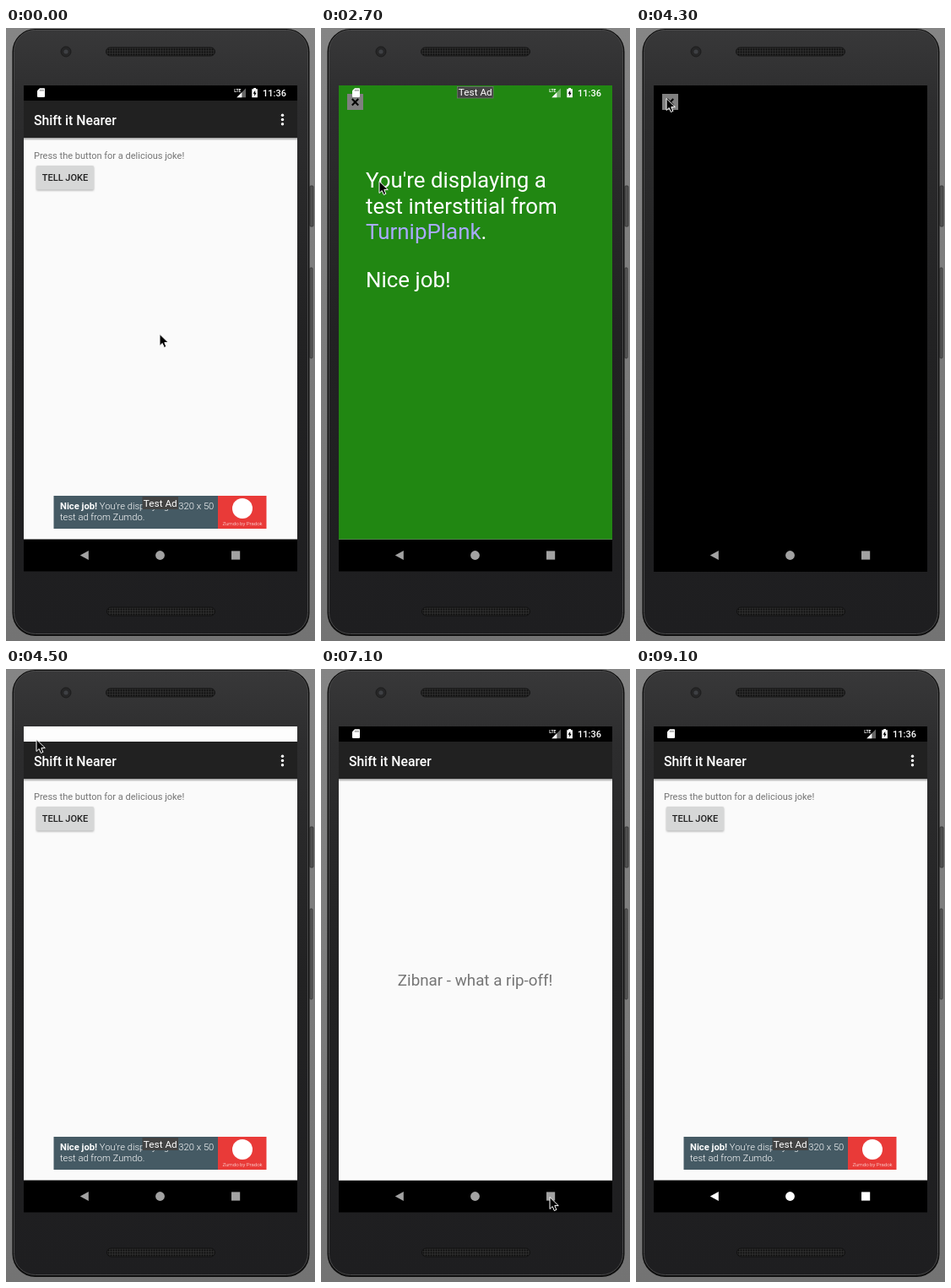
Animation, 366 px wide and 726 px high, one loop 9600 ms. Source, as an HTML page:

```html
<!DOCTYPE html>
<html lang="en">
<head>
<meta charset="utf-8">
<title>Joke app demo</title>
<style>
  html, body { margin: 0; width: 100%; height: 100%; overflow: hidden; background: #7f7f7f; }
  svg { display: block; width: 366px; height: 726px; font-family: Roboto, sans-serif; }
  text { white-space: pre; }
  .medium { font-weight: 500; }
  .small { font-size: 11.03px; }
  .title { font-size: 15.76px; font-weight: 500; fill: #fff; }
  .label { font-size: 11.8px; fill: #fff; text-anchor: middle; }
  .big { font-size: 25.9px; fill: #fff; }
  #button { fill: #d6d7d7; filter: drop-shadow(0 1px 1px rgba(0, 0, 0, .3)); }
  #joke, #inter, #blank, #close, #ring, #ripple { opacity: 0; }
</style>
</head>
<body>
<svg viewBox="0 0 366 726">
  <defs>
    <linearGradient id="body" x2="0" y2="1">
      <stop offset="0" stop-color="#383839"/>
      <stop offset=".12" stop-color="#2d2d2e"/>
      <stop offset=".5" stop-color="#222223"/>
      <stop offset="1" stop-color="#1e1e20"/>
    </linearGradient>
    <linearGradient id="room" x2="0" y2="1">
      <stop offset="0" stop-color="#858585"/>
      <stop offset="1" stop-color="#737373"/>
    </linearGradient>
    <linearGradient id="shade" x2="0" y2="1">
      <stop offset="0" stop-color="#000" stop-opacity=".38"/>
      <stop offset="1" stop-color="#000" stop-opacity="0"/>
    </linearGradient>
    <pattern id="mesh" width="3" height="3" patternUnits="userSpaceOnUse">
      <rect width="3" height="3" fill="#2b2b2b"/>
      <circle cx="1.5" cy="1.5" r="1" fill="#0c0c0c"/>
    </pattern>
    <clipPath id="screen"><rect x="21" y="68" width="324" height="575.5"/></clipPath>
    <clipPath id="navClip"><rect x="21" y="605.5" width="324" height="38"/></clipPath>
    <g id="page">
      <rect x="21" y="86" width="324" height="519.5" fill="#fafafa"/>
      <rect x="21" y="86" width="324" height="44" fill="#212121"/>
      <rect x="21" y="130" width="324" height="3.5" fill="url(#shade)"/>
      <text class="title" x="33" y="114.7">Shift it Nearer</text>
    </g>
  </defs>

  <!-- phone -->
  <rect width="366" height="726" fill="url(#room)"/>
  <rect x="360" y="187" width="4" height="48" rx="1" fill="#505050" stroke="#3a3a3a"/>
  <rect x="360" y="284" width="3" height="107" rx="1" fill="#585858" stroke="#3a3a3a"/>
  <rect x="7.5" y="1" width="352" height="719" rx="27" fill="#0e0e0e"/>
  <rect x="9.5" y="2.5" width="348" height="715" rx="25" fill="url(#body)" stroke="#49494a"/>
  <rect x="118.5" y="23" width="129" height="10" rx="5" fill="url(#mesh)" stroke="#151515"/>
  <rect x="119.5" y="686" width="128" height="10" rx="5" fill="url(#mesh)" stroke="#111"/>
  <circle cx="71" cy="28" r="6" fill="#262627" stroke="#1c1c1c"/>
  <circle cx="71" cy="28" r="2.6" fill="#3e4044"/>

  <g clip-path="url(#screen)">
    <rect x="21" y="68" width="324" height="576"/>

    <g id="main">
      <use href="#page"/>
      <g fill="#fff">
        <circle cx="327.5" cy="103.2" r="1.7"/>
        <circle cx="327.5" cy="108.5" r="1.7"/>
        <circle cx="327.5" cy="113.8" r="1.7"/>
      </g>
      <text class="small" x="33" y="155" fill="#757575">Press the button for a delicious joke!</text>
      <rect id="button" x="36" y="163" width="68" height="28.5" rx="1.6"/>
      <text class="small medium" x="70" y="181.3" text-anchor="middle" fill="#212121">TELL JOKE</text>

      <rect x="56.5" y="554" width="195" height="39" fill="#455a64"/>
      <rect x="251" y="554" width="57.5" height="39" fill="#e93a38"/>
      <text x="64" y="569.7" font-size="11.2" font-weight="300" fill="#fff"><tspan font-weight="700">Nice job!</tspan> You're displaying a 320 x 50</text>
      <text x="64" y="582.7" font-size="11.2" font-weight="300" fill="#fff">test ad from Zumdo.</text>
      <circle cx="280" cy="569" r="12" fill="#fff"/>
      <text x="280" y="589.3" font-size="6.1" font-weight="300" fill="#fff" text-anchor="middle">Zumdo by Pradok</text>
      <rect x="161.5" y="555" width="42.5" height="15" fill="#434343"/>
      <text class="label" x="182.8" y="566.6">Test Ad</text>
    </g>

    <g id="joke">
      <use href="#page"/>
      <text x="182.6" y="375" font-size="18.8" fill="#757575" text-anchor="middle">Zibnar - what a rip-off!</text>
    </g>

    <rect id="status" x="21" y="68" width="324" height="18"/>

    <g id="inter">
      <rect x="21" y="68" width="324" height="537.5" fill="#218712"/>
      <rect x="161.5" y="69.5" width="42.5" height="13.5" fill="#444" stroke="#777" stroke-width=".7"/>
      <text class="label" x="182.8" y="80.3">Test Ad</text>
      <text class="big" x="53" y="189">You're displaying a</text>
      <text class="big" x="53" y="219.7">test interstitial from</text>
      <text class="big" x="53" y="250.3"><tspan fill="#a9aaff">TurnipPlank</tspan>.</text>
      <text class="big" x="53" y="307">Nice job!</text>
    </g>
    <rect id="blank" x="21" y="68" width="324" height="576"/>

    <g id="close">
      <rect x="31" y="78" width="19" height="19" fill="#808080"/>
      <path d="M36.8 84l7.4 7.4m0-7.4l-7.4 7.4" stroke="#000" stroke-width="2.1"/>
    </g>

    <g id="icons" fill="#fff">
      <path d="M40 71.3h5.2q.8 0 .8.8v9q0 .8-.8.8h-7.4q-.8 0-.8-.8v-6.8z"/>
      <path d="M40.6 72.8v2m1.8-2v2m1.8-2v2" stroke="#555" stroke-width=".8"/>
      <path d="M284 71.5v10.7h-10.7z" opacity=".4"/>
      <path d="M279.3 76.2v6h-6z"/>
      <text x="270.3" y="75.8" font-size="5" font-weight="700">LTE</text>
      <path d="M293.2 72.2v-1.2h2.8v1.2h1.9v10h-6.6v-10z"/>
      <path d="M295.2 73.7l-2.6 4h1.6v3l2.5-4h-1.5z" fill="#000"/>
      <text class="small medium" x="304" y="81">11:36</text>
    </g>

    <g clip-path="url(#navClip)">
      <rect id="ripple" x="50" y="600" width="85" height="48" rx="24" fill="#fff"/>
    </g>
    <g id="nav" fill="#a2a2a2">
      <path d="M87.8 624.5l10-5.6v11.2z"/>
      <circle cx="182.5" cy="624.5" r="5.4"/>
      <rect x="267" y="619.4" width="10.2" height="10.2"/>
    </g>
  </g>

  <g id="cursor">
    <circle id="ring" cx="1" cy="2" r="22" fill="none" stroke="#000" stroke-width="2"/>
    <path d="M1 1.5v14l3.2-3 2.1 5 2.6-1.1-2.1-4.8h4.5z" fill="#000" stroke="#fff" stroke-linejoin="round"/>
  </g>
</svg>
<script>
  const LOOP = 9600, TICK = 100;

  // Keys are [ms, value]; moving parts advance once per tick, others hold.
  function play(id, prop, keys, moving) {
    const all = [...keys, [LOOP, keys[keys.length - 1][1]]];
    const frames = all.map(([t, value], i) => {
      const next = all[i + 1] || [t + TICK];
      const n = moving ? Math.max(1, Math.round((next[0] - t) / TICK)) : 1;
      return { offset: t / LOOP, [prop]: value, easing: `steps(${n}, end)` };
    });
    document.getElementById(id).animate(frames, { duration: LOOP, iterations: Infinity });
  }

  const at = (t, x, y) => [t, `translate(${x}px, ${y}px)`];
  const show = (id, ...spans) =>
    play(id, 'opacity', [[0, 0], ...spans.flatMap(([from, to]) => [[from, 1], [to, 0]])]);

  play('cursor', 'transform', [
    at(0, 181, 361), at(900, 181, 361), at(1100, 166, 336), at(1500, 84, 208), at(1700, 68, 180),
    at(2700, 68, 180), at(3000, 60, 150), at(3400, 39, 92), at(3600, 35, 82),
    at(5900, 35, 82), at(6000, 35, 83), at(6400, 170, 260), at(6700, 310, 540), at(6900, 351, 621),
    at(7000, 351, 621), at(7300, 108, 630), at(7400, 97, 631), at(7500, 97, 631),
    at(7700, 116, 627), at(7900, 345, 605)
  ], true);
  play('cursor', 'opacity', [[0, 1], [8000, 0]]);
  show('ring', [1800, 2000], [3900, 4100], [7400, 7600]);

  play('button', 'fill', [[0, '#d6d7d7'], [2000, '#c6c7c7'], [2100, '#b9baba'], [2300, '#c8c9c9'], [2500, '#d6d7d7']]);

  show('inter', [2700, 4200]);
  show('blank', [4200, 4400]);
  show('close', [2700, 4400]);
  play('icons', 'opacity', [[0, 1], [4200, 0], [4700, 1]]);
  play('status', 'fill', [[0, '#000'], [4400, '#fdfdfd'], [4700, '#000']]);

  play('joke', 'opacity', [[0, 0], [4700, .7], [4800, 1], [7700, .28], [7800, .04], [7900, 0]]);
  play('joke', 'transform', [
    at(0, 0, 28), at(4800, 0, 7), at(4900, 0, 0), at(7600, 0, 5), at(7700, 0, 21), at(7800, 0, 40)
  ]);
  play('main', 'opacity', [[0, 1], [7600, .85], [7700, .97], [7800, 1]]);

  play('nav', 'fill', [[0, '#a2a2a2'], [7400, '#fff']]);
  play('ripple', 'opacity', [[0, 0], [7400, .06], [7500, .12], [7700, .07], [7800, .04], [7900, .02], [8000, 0]]);
</script>
</body>
</html>
```
